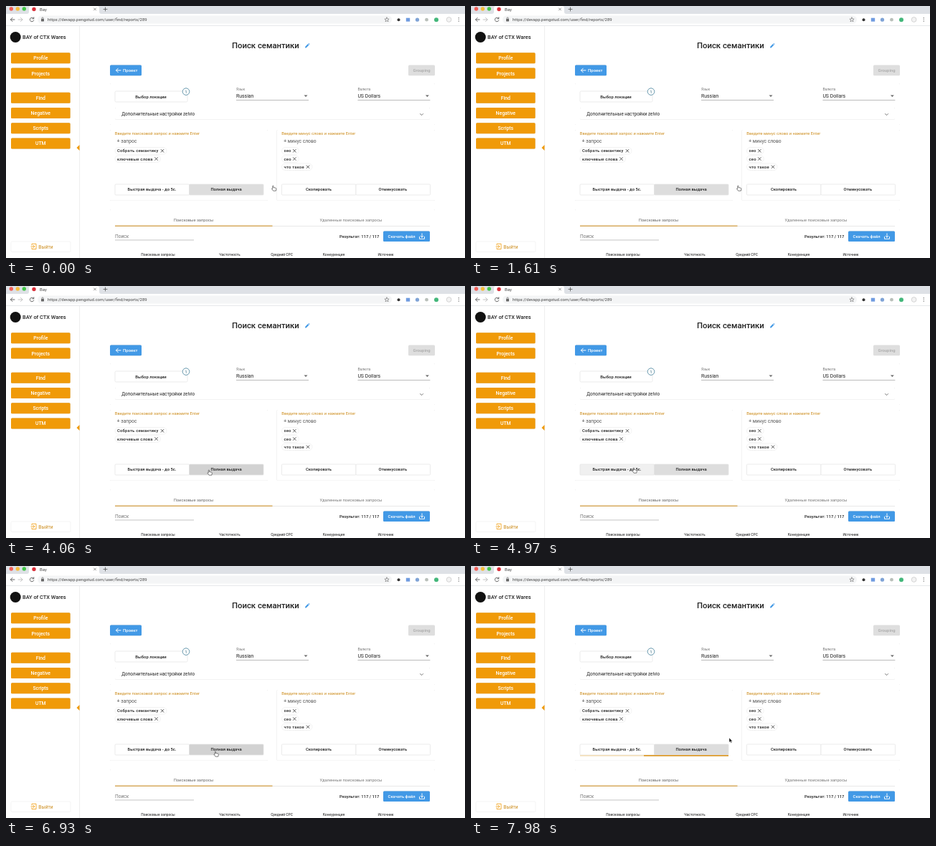
An HTML page for the animation above (8000 ms loop, 640x352 px).

```html
<!DOCTYPE html>
<html lang="ru">
<meta charset="utf-8">
<title>Bay</title>
<style>
  html, body { margin: 0; width: 100%; height: 100%; overflow: hidden; background: #fff; }
  svg { display: block; width: 640px; height: 352px; font-family: Roboto, sans-serif; }
  .card { fill: #fff; filter: drop-shadow(0 .9px .6px rgba(0, 0, 0, .2)); }
  .outline { fill: #fff; stroke: #e2e2e2; stroke-width: .7; }
  .icon { fill: none; stroke-linecap: round; stroke-linejoin: round; }
</style>
<svg id="stage" viewBox="0 0 640 352"></svg>
<script>
const LOOP = 8000;
const ORANGE = '#f09a08', BLUE = '#4299e6', AMBER = '#cc8c1c', INK = '#222', GREY = '#777';
const stage = document.getElementById('stage');

function add(tag, attrs, parent = stage) {
  const node = document.createElementNS('http://www.w3.org/2000/svg', tag);
  for (const key in attrs) node.setAttribute(key, attrs[key]);
  return parent.appendChild(node);
}
const rect = (x, y, width, height, fill, rx = 0) => add('rect', { x, y, width, height, fill, rx });
const box = (cls, x, y, width, height, rx = 1.5) => add('rect', { class: cls, x, y, width, height, rx });
const dot = (cx, cy, r, fill) => add('circle', { cx, cy, r, fill });
const shape = (d, fill) => add('path', { d, fill });
const icon = (d, stroke = INK, width = 1) => add('path', { class: 'icon', d, stroke, 'stroke-width': width });
function text(label, x, y, size, fill = INK, weight = 400, anchor = 'start', spacing = 0) {
  add('text', { x, y, fill, 'font-size': size, 'font-weight': weight, 'text-anchor': anchor, 'letter-spacing': spacing })
    .textContent = label;
}
const centered = (label, x, y, size, fill, weight = 500) => text(label, x, y, size, fill, weight, 'middle');
const cross = (x, y, r, color, width) =>
  icon(`M${x - r} ${y - r}l${2 * r} ${2 * r}m0 ${-2 * r}l${-2 * r} ${2 * r}`, color, width);

function drawBrowser() {
  rect(0, 0, 640, 11, '#dee1e6');
  ['#f25f57', '#f6bd3b', '#45c64b'].forEach((color, i) => dot(7.3 + i * 9, 4, 2.7, color));
  shape('M29 11Q32 11 32 8V3Q32 0 35 0H127Q130 0 130 3V8Q130 11 133 11Z', '#fff');
  dot(39, 4.5, 2.7, '#d9303a');
  text('Bay', 47, 6.7, 6, '#444');
  cross(124, 4.5, 1.5, '#666', .7);
  icon('M136 4.5h5M138.5 2v5', '#555', .8);
  rect(0, 27, 640, .7, '#dcdee1');
  icon('M12 19H6.4m2.6-2.6L6.4 19l2.6 2.6', '#555', .9);
  icon('M17 19h6m-2.6-2.6L23 19l-2.6 2.6', '#bbb', .9);
  icon('M38.4 17.3A2.8 2.8 0 1 0 38.8 20M38.8 15.8v2h-2', '#555', .9);
  rect(44, 13.5, 494, 11, '#f4f5f6', 5.5);
  rect(49, 18, 4, 3.5, '#666', .4);
  icon('M49.9 18v-1a1.1 1.1 0 0 1 2.2 0v1', '#666', .7);
  text('https://devapp.pengstud.com/user/find/reports/289', 58, 21.2, 5.96, '#444');
  icon('M531 16l.9 2 2.2.2-1.7 1.4.6 2.2-2-1.2-2 1.2.6-2.2-1.7-1.4 2.2-.2Z', '#666', .6);
  dot(547.5, 19.2, 2, '#333');
  rect(557.8, 16.7, 5.4, 5, '#6f9be0');
  dot(573.5, 19.2, 2.6, '#7fa3d6');
  dot(586.5, 19.2, 2.4, '#b9c0ba');
  dot(600, 19.2, 3, '#43b77a');
  add('circle', { cx: 617.6, cy: 19, r: 3.4, fill: '#f3f3f3', stroke: '#c4c4c4', 'stroke-width': .7 });
  [16.7, 19, 21.3].forEach(y => dot(631.2, y, .6, '#555'));
}

function drawSidebar() {
  rect(102.3, 28, .8, 324, '#e8e8e8');
  dot(13.2, 43.5, 7.5, '#111');
  text('BAY of CTX Wares', 23, 45.8, 7.4, INK, 500);
  const items = { Profile: 65.3, Projects: 86.5, Find: 120.8, Negative: 142, Scripts: 163.2, UTM: 184.4 };
  for (const label in items) {
    box('card', 7, items[label], 82.6, 15).style.fill = ORANGE;
    centered(label, 48.3, items[label] + 10, 6.9, '#fff');
  }
  shape('M98.5 198l4-4v8Z', ORANGE);
  box('outline', 7, 329, 83, 14.5).style.stroke = '#f0f0f0';
  icon('M36 334v-1.8h6v7.4h-6v-1.8M35 336h4.7m-1.6-1.7 1.7 1.7-1.7 1.7', ORANGE, .8);
  text('Выйти', 45.3, 338.6, 6.7, AMBER);
}

function drawSelect(label, value, x) {
  text(label, x, 117.6, 5, GREY);
  text(value, x, 128.2, 6.9);
  rect(x, 131, 101, .8, '#aaa');
  shape(`M${x + 94.5} 124.5h5l-2.5 2.5Z`, '#666');
}

function drawSettings() {
  text('Поиск семантики', 315, 59, 11.3, INK, 500);
  shape('M417 58.4l.3-1.7 3.6-3.6 1.5 1.5-3.6 3.6ZM421.4 52.6l.8-.7 1.4 1.4-.7.8Z', BLUE);
  box('card', 145, 82.4, 44, 14.8).style.fill = BLUE;
  icon('M160 89.9h-6.5m2.8-2.8-2.8 2.8 2.8 2.8', '#fff');
  text('Проект', 163, 92.1, 6, '#fff', 500);
  rect(561, 82.4, 37, 14.8, '#dedede', 1.5);
  centered('Grouping', 579.5, 92, 5.9, '#a9a9a9');

  box('card', 145, 108, 453, 58);
  box('outline', 152, 119, 101, 15);
  centered('Выбор локации', 202, 128.7, 5.9);
  add('circle', { cx: 251, cy: 119.6, r: 4.8, fill: '#fff', stroke: '#548ca4', 'stroke-width': .9 });
  centered('1', 251, 121.5, 5.2, '#42748a');
  drawSelect('Язык', 'Russian', 321);
  drawSelect('Валюта', 'US Dollars', 490.4);
  box('card', 152, 142, 439, 16.5);
  text('Дополнительные настройки zelvio', 161.3, 152.6, 6.3);
  icon('M577.6 150.6l2 2 2-2', '#666', .9);
}

function drawWords(x, width, title, hint, chips) {
  box('card', x, 173, width, 98.7);
  text(title, x + 6.8, 179.7, 5.75, AMBER);
  text(hint, x + 9.8, 191.1, 6.7, '#555');
  chips.forEach(([label, crossX], i) => {
    const y = 202.3 + i * 11.2;
    box('outline', x + 7, y - 4.8, crossX - x - 1, 9.6, 4.8).style.stroke = '#ececec';
    text(label, x + 10, y + 2, 5.9, INK, 500, 'start', .2);
    cross(crossX, y, 1.9, '#333', .8);
  });
  return [box('outline', x + 7, 249, 103.5, 15, 1), box('outline', x + 110.5, 249, 103.5, 15, 1)];
}

function drawResults() {
  box('card', 145, 284, 453, 80);
  centered('Поисковые запросы', 261.5, 301.2, 5.75, '#666', 400);
  centered('Удаленные поисковые запросы', 481, 301.2, 5.75, GREY, 400);
  rect(152, 307.2, 439, .7, '#ddd');
  rect(152, 306.6, 219.5, 1.2, '#d09a3a');
  text('Поиск', 152, 323.7, 6.6, GREY);
  rect(152, 326.6, 110, .7, '#aaa');
  text('Результат: 117 / 117', 465, 324.3, 5.8, INK, 500);
  box('card', 526, 314.6, 65, 14.5).style.fill = BLUE;
  text('Скачать файл', 532.6, 324.2, 5.8, '#fff', 500);
  icon('M576.5 322.3v3h7v-3M580 317.8v5.3m-1.9-1.9 1.9 1.9 1.9-1.9', '#fff', .9);
  const columns = { 'Поисковые запросы': 212, 'Частотность': 312, 'Средний CPC': 384.5, 'Конкуренция': 457, 'Источник': 529.5 };
  for (const label in columns) centered(label, columns[label], 349, 4.9, '#444');
}

drawBrowser();
drawSidebar();
drawSettings();
const [fastButton, fullButton] = drawWords(145, 220, 'Введите поисковой запрос и нажмите Enter', '+ запрос',
  [['Собрать семантику', 218], ['ключевые слова', 209.5]]);
drawWords(377.5, 220.5, 'Введите минус слово и нажмите Enter', '+ минус слово',
  [['seo', 402.3], ['ceo', 402.3], ['что такое', 421]]);
centered('Быстрая выдача - до 5с.', 203.5, 258.3, 5.85);
centered('Полная выдача', 307, 258.3, 5.85);
centered('Скопировать', 436, 258.3, 5.85);
centered('Отминусовать', 539.3, 258.3, 5.85);
const track = rect(152, 264, 207, 1.7, '#f3dfba');
const bar = rect(152, 264, 0, 1.7, '#dc9a2c');
drawResults();

const cursor = add('g', { 'stroke-linejoin': 'round' });
const hand = add('path', { fill: '#fff', stroke: '#333', 'stroke-width': .7, transform: 'translate(.2 .6) scale(.9)',
  d: 'M-2.2-3.5Q-1.5-4.6-.8-3.5V-1.2L2.6-.5Q3.6-.2 3.5 1L2.9 4H-1.2L-3.5.9Q-3.4-.3-2.2.6Z' }, cursor);
const arrow = add('path', { fill: '#111', stroke: '#fff', 'stroke-width': .4,
  d: 'M-1-3V3.3L.5 2 1.6 4.3 2.6 3.8 1.6 1.7H3.5Z' }, cursor);

// Each key is [time, value, ...]; returns the interpolated values.
const smooth = u => u * u * (3 - 2 * u);
function at(keys, t, ease = u => u) {
  const i = keys.findIndex(key => key[0] > t);
  if (i < 0) return keys[keys.length - 1].slice(1);
  if (i === 0) return keys[0].slice(1);
  const a = keys[i - 1], b = keys[i], u = ease((t - a[0]) / (b[0] - a[0]));
  return a.slice(1).map((v, k) => v + (b[k + 1] - v) * u);
}

const PATH = [[2310, 373.5, 254], [2560, 228, 261], [3150, 228, 261], [3700, 284, 260], [4340, 284, 260],
  [4900, 228, 257], [5850, 228, 257], [6600, 293, 262], [7500, 293, 262], [7960, 361, 243]];
const FAST = [[2420, 255], [2560, 240], [3350, 240], [3550, 255], [4600, 255], [4800, 240], [6130, 240], [6330, 255]];
const FULL = [[3400, 221], [3600, 210], [4550, 210], [4750, 221], [6200, 221], [6400, 210],
  [7060, 210], [7250, 190], [7450, 190], [7800, 221]];
const BAR_START = [[7450, 0], [7980, .43]];
const BAR_END = [[7090, 0], [7350, .304], [7530, .6], [7850, 1]];
const grey = v => `rgb(${v},${v},${v})`;

function frame(now) {
  const t = now % LOOP;
  fastButton.style.fill = grey(at(FAST, t)[0]);
  fullButton.style.fill = grey(at(FULL, t)[0]);
  const start = at(BAR_START, t)[0], end = at(BAR_END, t)[0];
  track.style.opacity = t < 7070 ? 0 : 1;
  bar.setAttribute('x', 152 + 207 * start);
  bar.setAttribute('width', 207 * (end - start));
  const isArrow = t > 7760;
  hand.style.opacity = isArrow ? 0 : 1;
  arrow.style.opacity = isArrow ? 1 : 0;
  cursor.setAttribute('transform', `translate(${at(PATH, t, smooth)})`);
  requestAnimationFrame(frame);
}
requestAnimationFrame(frame);
</script>
</html>
```
